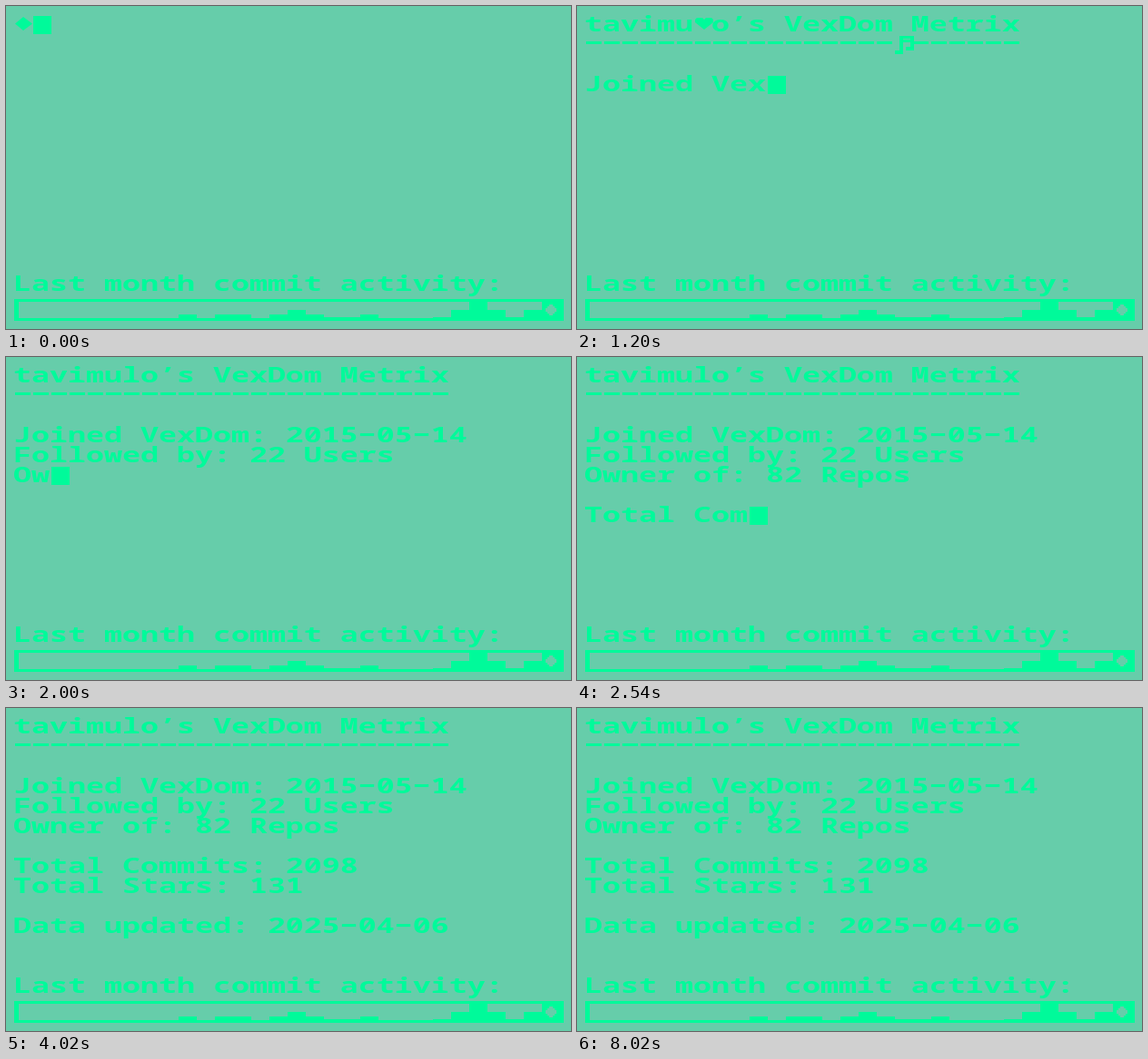
Animation, 622 px wide and 356 px high, one loop 8420 ms. Source, as an HTML page:

```html
<!DOCTYPE html>
<html lang="en">
<head>
<meta charset="utf-8">
<title>Commit terminal</title>
<style>
  html, body { margin: 0; width: 100%; height: 100%; overflow: hidden; background: #66cdaa; }
  svg { display: block; width: 622px; height: 356px; fill: #00fa9a; }
  text { font: 700 24px "Noto Sans Mono", "DejaVu Sans Mono", monospace; white-space: pre; }
  .pixel { shape-rendering: crispEdges; fill-rule: evenodd; }
</style>
</head>
<body>
<svg viewBox="0 0 622 356">
  <g id="rows"></g>
  <path id="rule" class="pixel"/>
  <g id="symbols"></g>
  <rect id="cursor" class="pixel" width="20" height="20"/>
  <path class="pixel" d="M9 323H614V347H9Z M14 326V344H611V326Z"/>
  <path id="bars" class="pixel"/>
  <path class="pixel" fill="#66cdaa" d="M598 329h4v2h2v2h2v4h-2v2h-2v2h-4v-2h-2v-2h-2v-4h2v-2h2z"/>
</svg>
<script>
const LOOP = 8420, STEP = 20, BLINK = 400, CELL = 20, LINE = 22, LEFT = 10, TOP = 11;
const RULE_ROW = 1, CAPTION_ROW = 13, ADVANCE = 14.4;
const lines = [
  "tavimulo’s VexDom Metrix",
  "-".repeat(24),
  "",
  "Joined VexDom: 2015-05-14",
  "Followed by: 22 Users",
  "Owner of: 82 Repos",
  "",
  "Total Commits: 2098",
  "Total Stars: 131",
  "",
  "Data updated: 2025-04-06"
];
const script = lines.join("\n");
const typedAt = script.length * STEP;

const shapes = {
  diamond: "M9 1L19 8.5L9 16L0 8.5Z",
  heart: "M2 2H8L10 4L12 2H18L20 4V7L10 15L0 7V4Z",
  notes: "M5 0H21V16H12V12H17V7H9V20H0V16H5Z M9 3H17V4H9Z",
  dot: "M4 10A6 6 0 0 1 16 10A6 6 0 0 1 4 10Z"
};
// Brief character swaps: first step, steps shown, row, column, shape
const glitches = [
  [0, 1, 0, 0, "diamond"],
  [59, 3, 0, 6, "heart"],
  [60, 2, 1, 17, "notes"],
  [108, 2, 1, 9, "dot"],
  [144, 2, 0, 22, "diamond"]
];
// Bar heights for the last days of the month, by day index
const activity = { 9: 5, 11: 5, 12: 5, 14: 5, 15: 10, 16: 5, 17: 2, 18: 2, 19: 5,
  23: 2, 24: 10, 25: 21, 26: 10, 27: 2, 28: 10, 29: 21 };

const byId = id => document.getElementById(id);
const cellX = col => LEFT + col * CELL;
const cellY = row => TOP + row * LINE;

function add(parent, tag, attrs) {
  const el = document.createElementNS("http://www.w3.org/2000/svg", tag);
  for (const name in attrs) el.setAttribute(name, attrs[name]);
  return parent.appendChild(el);
}

// One wide terminal face for every row
const addRow = row => add(byId("rows"), "text", {
  transform: `translate(${LEFT - 2} ${cellY(row) + 17}) scale(${CELL / ADVANCE} 1)`
});

const rows = lines.map((_, row) => addRow(row));
addRow(CAPTION_ROW).textContent = "Last month commit activity:";

const symbols = glitches.map(([, , row, col, shape]) => add(byId("symbols"), "path", {
  d: shapes[shape], "fill-rule": "evenodd",
  transform: `translate(${cellX(col)} ${cellY(row)})`
}));

byId("bars").setAttribute("d", Object.entries(activity)
  .map(([day, h]) => `M${cellX(+day)} 345v${-h}h${day == 29 ? 24 : CELL}v${h}z`).join(""));

function draw(time) {
  const t = time % LOOP;
  const step = Math.min(Math.floor(t / STEP), script.length - 1);
  const typed = script.slice(0, step + 1).split("\n").map(line => [...line]);
  const lastRow = typed.length - 1;
  const cursor = byId("cursor");
  cursor.setAttribute("x", cellX(typed[lastRow].length));
  cursor.setAttribute("y", cellY(lastRow));
  const visible = t < typedAt || Math.floor((t - typedAt) / BLINK) % 2 === 0;
  cursor.style.display = visible ? "" : "none";

  glitches.forEach(([start, length, row, col], i) => {
    const on = step >= start && step < start + length;
    symbols[i].style.display = on ? "" : "none";
    if (on) typed[row][col] = "\u00a0";
  });

  rows.forEach((el, row) => {
    el.textContent = row === RULE_ROW ? "" : (typed[row] || []).join("").replace(/-/g, "−");
  });
  byId("rule").setAttribute("d", (typed[RULE_ROW] || [])
    .map((c, col) => c === "-" ? `M${cellX(col)} 39h17v3h-17z` : "").join(""));
}

function tick(now) {
  draw(now);
  requestAnimationFrame(tick);
}
draw(0);
requestAnimationFrame(tick);
</script>
</body>
</html>
```
